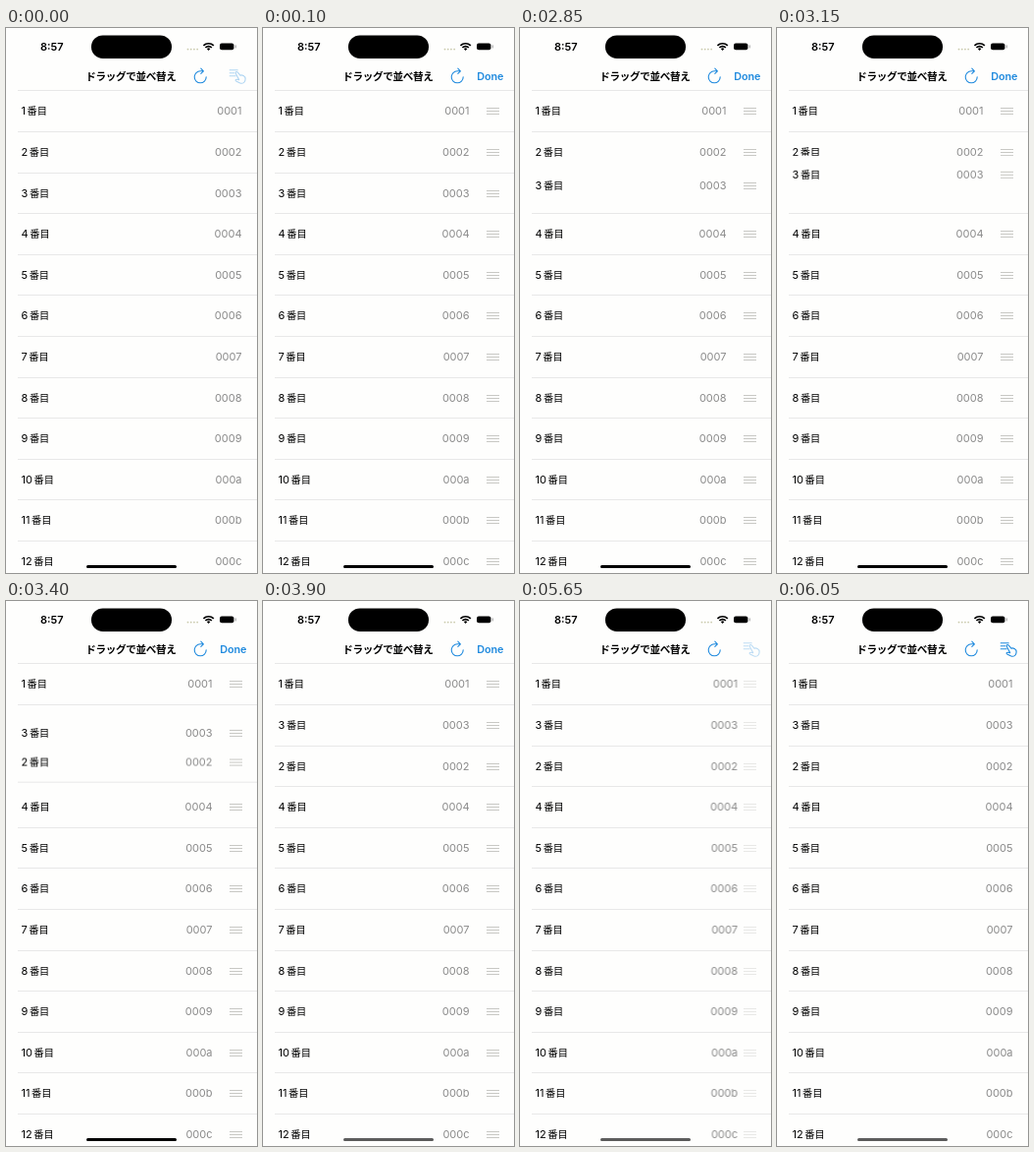
Write an HTML page that moves like this. It is 256 by 554 pixels and loops after 6.1 s.

```html
<!DOCTYPE html>
<html lang="ja">
<head>
<meta charset="utf-8">
<style>
:root { --bg: #fefefd; --blue: #1f8ade; --loop: 6.1s linear infinite; }
html, body { margin: 0; width: 100%; height: 100%; overflow: hidden; background: var(--bg); }
#stage {
  position: relative; width: 256px; height: 554px; overflow: hidden; background: var(--bg);
  font: 400 11px Inter, "Noto Sans CJK JP", "Noto Sans CJK", sans-serif; color: #000;
}
#stage > *, .row > * { position: absolute; }
svg { left: 0; top: 0; }

.title {
  left: -.7px; width: 256px; top: 39px; text-align: center; white-space: nowrap;
  font: 700 10.6px/20px "Noto Sans CJK JP", "Noto Sans CJK", sans-serif; letter-spacing: -.35px;
}
.clock { left: 35px; top: 9px; font-weight: 600; line-height: 20px; }
.done {
  right: 10.5px; top: 40px; font-weight: 600; font-size: 10.8px; line-height: 20px;
  color: var(--blue); animation: done var(--loop);
}
.edit { animation: edit var(--loop); }
.home {
  left: 82px; top: 545.5px; width: 92px; height: 3.5px; border-radius: 2px; z-index: 5;
  animation: home var(--loop);
}

.row { left: 0; width: 256px; height: 42px; line-height: 43px; }
.label { left: 15.5px; white-space: nowrap; }
.label span { margin-left: 1.6px; font-size: 10.2px; }
.value { right: 15.5px; color: #8a8a8a; animation: value var(--loop); }
.grip {
  left: 228px; top: 18px; width: 13px; height: 7px; animation: grip var(--loop);
  background: repeating-linear-gradient(#c8c8c4 0 1px, transparent 1px 3px);
}
.line { left: 12px; right: 0; height: 1px; background: #e8e8e8; }
.swapped { animation: swapped var(--loop); }
.row.swapped { --move: 42px; }
.line.swapped { --move: 41px; }
.line.gap { animation: gap var(--loop); }
.row.dragged { z-index: 2; animation: dragged var(--loop); }
.cover { inset: 2px 0; background: var(--bg); }

@keyframes value {
  0% { transform: none; animation-timing-function: step-end; }
  1.639% { transform: translateX(-30px); }
  90.16% { transform: translateX(-30px); animation-timing-function: ease-in-out; }
  95.9%, 100% { transform: none; }
}
@keyframes grip {
  0% { opacity: 0; animation-timing-function: step-end; }
  1.639%, 90.16% { opacity: 1; }
  94.26%, 100% { opacity: 0; }
}
@keyframes done {
  0% { opacity: 0; animation-timing-function: step-end; }
  1.639% { opacity: 1; animation-timing-function: step-end; }
  87.704%, 90.16% { opacity: .25; }
  92.62%, 100% { opacity: 0; }
}
@keyframes edit {
  0% { opacity: .35; animation-timing-function: step-end; }
  1.639%, 91% { opacity: 0; }
  96.72%, 100% { opacity: 1; }
}
@keyframes home {
  0% { background: #000; animation-timing-function: step-end; }
  63.934%, 100% { background: #5c5c5c; }
}
@keyframes dragged {
  0%, 41.803% { transform: none; animation-timing-function: ease-in; }
  46.721% { transform: translateY(-8px); }
  52.459% { transform: translateY(-21px); }
  55.737% { transform: translateY(-34px); animation-timing-function: ease-out; }
  59.836%, 100% { transform: translateY(-42px); }
}
@keyframes swapped {
  0%, 52.459% { transform: none; animation-timing-function: ease-in-out; }
  56.721%, 100% { transform: translateY(var(--move)); }
}
@keyframes gap {
  0% { transform: none; animation-timing-function: step-end; }
  52.459%, 100% { transform: translateY(-41px); }
}
</style>
</head>
<body>
<div id="stage">
  <svg width="256" height="64" fill="none" stroke-linecap="round" stroke-linejoin="round">
    <rect x="87" y="7.4" width="82" height="23.6" rx="11.8" fill="#000"/>
    <g fill="#c9c9ac">
      <circle cx="185.5" cy="21.6" r=".9"/><circle cx="188.7" cy="21.6" r=".9"/>
      <circle cx="191.9" cy="21.6" r=".9"/><circle cx="195.1" cy="21.6" r=".9"/>
    </g>
    <g stroke="#000" stroke-width="1.7" stroke-linecap="butt">
      <path d="M201.4 17.9a7.4 7.4 0 0 1 10.4 0M203.4 20a4.5 4.5 0 0 1 6.4 0"/>
      <path d="M206.6 23l-1.7-1.8a2.4 2.4 0 0 1 3.4 0z" fill="#000" stroke="none"/>
    </g>
    <rect x="218" y="15.6" width="14.4" height="6.6" rx="2" fill="#000"/>
    <path d="M234.2 17.8v2.2" stroke="#999" stroke-width="1"/>
    <g stroke="var(--blue)" stroke-width="1.1">
      <path d="M204.2 49.8a6 6 0 1 1-6-6h3M198.8 41.2l2.6 2.6-2.6 2.6"/>
      <g class="edit" transform="translate(228 41)">
        <path d="M.2 1.7h8M.2 4.7h4.6M.2 7.7h6"/>
        <path d="M9.7 11.6L6.4 5.4C5.6 4.1 7 2.9 8.1 3.9L11.2 7.3c.6-.9 1.7-.6 2 .2.7-.5 1.5 0 1.7.7 1.1.3 1.4 2 1.1 3.7-.4 2.5-2.4 3.7-4.6 3.3-1.8-.3-2.8-1.5-4.8-2.3-1-.6-.4-1.8.8-1.7z"/>
      </g>
    </g>
  </svg>
  <div class="clock">8:57</div>
  <div class="title">ドラッグで並べ替え</div>
  <div class="done">Done</div>
  <div class="home"></div>
</div>
<script>
const stage = document.getElementById('stage');
const rowKinds = { 2: 'swapped', 3: 'dragged' };
const lineKinds = { 2: 'swapped', 3: 'gap' };
const edge = n => Math.round(63.4 + 41.6 * n);

function add(kind, extra, top, html = '') {
  const el = document.createElement('div');
  el.className = `${kind} ${extra || ''}`;
  el.style.top = `${top}px`;
  el.innerHTML = html;
  stage.append(el);
}

for (let n = 0; n <= 11; n++) add('line', lineKinds[n], edge(n));
for (let n = 1; n <= 12; n++) {
  const cover = rowKinds[n] === 'dragged' ? '<div class="cover"></div>' : '';
  add('row', rowKinds[n], edge(n - 1), `${cover}<div class="label">${n}<span>番目</span></div>
    <div class="value">${n.toString(16).padStart(4, '0')}</div><div class="grip"></div>`);
}
</script>
</body>
</html>
```
